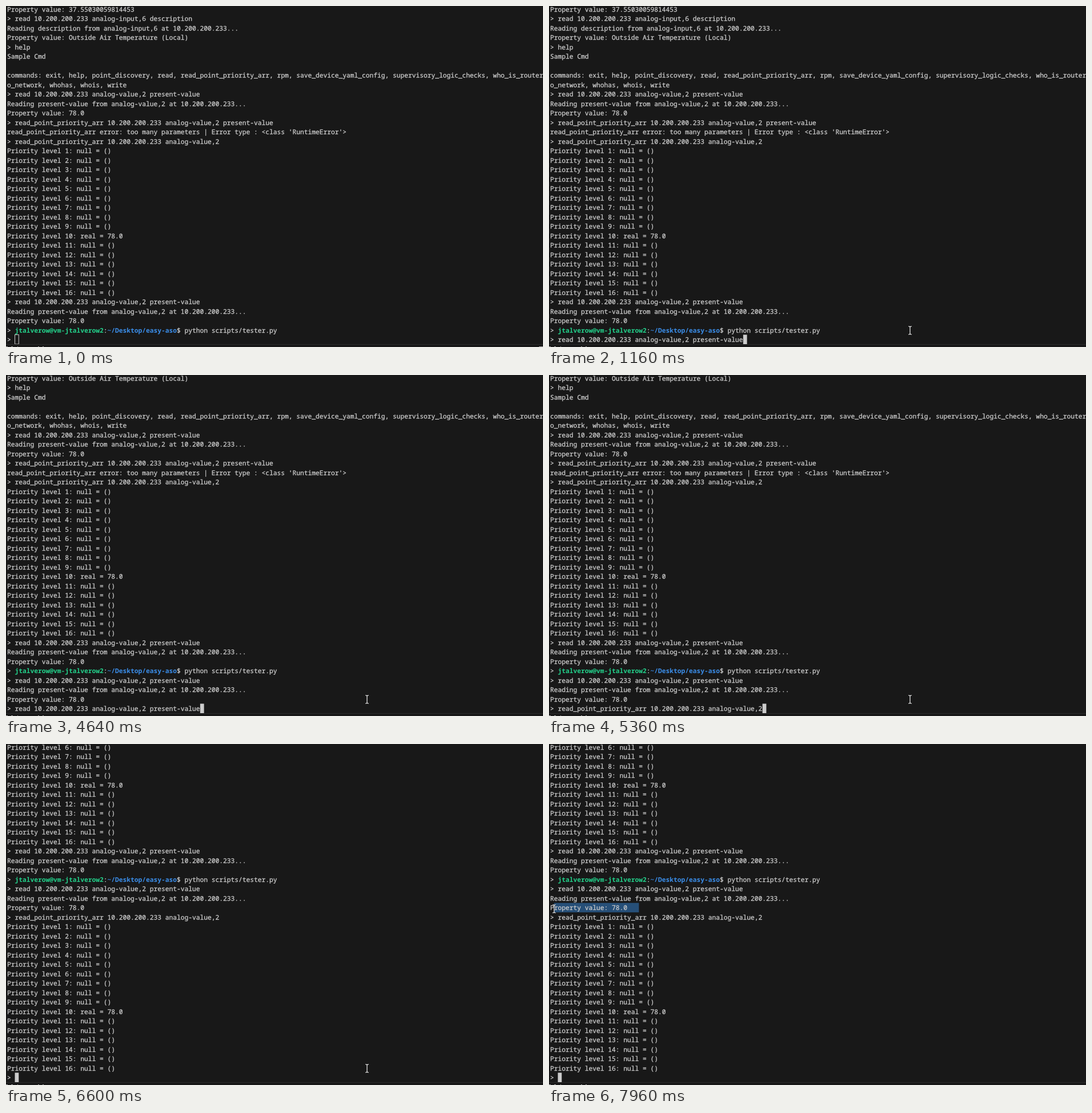
An HTML page that plays this animation: 940 px wide and 596 px high, repeating every 8000 ms.

```html
<!DOCTYPE html>
<html lang="en">
<head>
<meta charset="utf-8">
<title>Terminal</title>
<style>
  html, body { margin: 0; width: 100%; height: 100%; overflow: hidden; background: #181818; }
  #stage { position: relative; width: 940px; height: 596px; overflow: hidden; background: #181818; }
  #stage > * { position: absolute; }
  #text {
    left: 2px; top: -1.5px; color: #ccc; white-space: pre;
    font: 11.262px/16.5px "Noto Sans Mono", "DejaVu Sans Mono", monospace;
    font-variant-ligatures: none; text-rendering: geometricPrecision;
    -webkit-text-stroke: .3px currentColor;
  }
  #text div { height: 16.5px; }
  b { color: #23d18b; -webkit-text-stroke: 0; }
  b.path { color: #3b8eea; }
  #boxes { left: 0; top: 0; }
  #mark { fill: #264f78; }
  #caret { fill: #ccc; }
  #caret.hollow { fill: none; stroke: #ccc; }
  #edge { left: 0; top: 591px; width: 940px; height: 1px; background: #2b2b2b; }
  #status i { position: absolute; top: 595px; height: 1px; background: #aaa; }
  #mouse { left: -5px; top: -9px; width: 10px; height: 18px; }
</style>
</head>
<body>
<div id="stage">
  <svg id="boxes" width="940" height="596">
    <rect id="mark" y="277.75" height="16.5"/>
    <rect id="caret" y="574.5" width="6.757" height="16.5"/>
  </svg>
  <div id="text"></div>
  <div id="edge"></div>
  <div id="status">
    <i style="left:0;width:3px"></i><i style="left:9px;width:3px"></i>
    <i style="left:20px;width:1px"></i><i style="left:56px;width:2px"></i>
    <i style="left:64px;width:2px"></i><i id="corner" style="left:933px;width:7px"></i>
  </div>
  <svg id="mouse" viewBox="-5 -9 10 18" fill="none">
    <path d="M-3 -7H-1L0 -6L1 -7H3M0 -6V6M-3 7H-1L0 6L1 7H3" stroke="#000" stroke-width="2.6" opacity=".5"/>
    <path d="M-3 -7H-1L0 -6L1 -7H3M0 -6V6M-3 7H-1L0 6L1 7H3" stroke="#fff" stroke-width="1.2"/>
  </svg>
</div>
<script>
const LOOP = 8000, TICK = 40, ROWS = 36, CELL = 6.757, LEFT = 2;
const $ = id => document.getElementById(id);
const text = $('text'), caret = $('caret'), mark = $('mark'), mouse = $('mouse'), corner = $('corner');

const HOST = '10.200.200.233';
const readCmd = `read ${HOST} analog-value,2 present-value`;
const arrCmd = `read_point_priority_arr ${HOST} analog-value,2`;
const readOut = [`Reading present-value from analog-value,2 at ${HOST}...`, 'Property value: 78.0'];
const arrOut = Array.from({ length: 16 }, (_, i) =>
  `Priority level ${i + 1}: ${i === 9 ? 'real = 78.0' : 'null = ()'}`);
const shell = '> <b>jtalverow@vm-jtalverow2</b>:<b class="path">~/Desktop/easy-aso</b>$ python scripts/tester.py';
const esc = s => s.replace(/</g, '&lt;').replace(/>/g, '&gt;');

const history = [
  'Property value: 37.55030059814453',
  `> read ${HOST} analog-input,6 description`,
  `Reading description from analog-input,6 at ${HOST}...`,
  'Property value: Outside Air Temperature (Local)',
  '> help',
  'Sample Cmd',
  '',
  'commands: exit, help, point_discovery, read, read_point_priority_arr, rpm, save_device_yaml_config, supervisory_logic_checks, who_is_router_t',
  'o_network, whohas, whois, write',
  '> ' + readCmd, ...readOut,
  `> ${arrCmd} present-value`,
  "read_point_priority_arr error: too many parameters | Error type : <class 'RuntimeError'>",
  '> ' + arrCmd, ...arrOut,
  '> ' + readCmd, ...readOut
].map(esc).concat(shell);

const afterRead = [...history, ...['> ' + readCmd, ...readOut].map(esc)];
const sent = [...afterRead, esc('> ' + arrCmd)];
const afterArr = [...sent, ...arrOut];

// [start time, finished lines, line being edited]
const scenes = [
  [0, history, '> '],
  [1160, history, '> ' + readCmd],
  [4040, afterRead, '> '],
  [4640, afterRead, '> ' + readCmd],
  [5360, afterRead, '> ' + arrCmd],
  [6560, sent, ''],
  [6600, afterArr, '> ']
];

// [time, x, y]
const path = [
  [40, 936, 588], [200, 830, 564], [400, 690, 543], [560, 640, 556], [680, 632, 567],
  [7160, 632, 567], [7320, 480, 430], [7480, 270, 270], [7560, 200, 243],
  [7680, 157, 286], [7960, 9, 288]
];
const FOCUS = 640, PRESS = 7680, PRESS_COL = 23;

function mouseAt(t) {
  const i = path.findIndex(p => p[0] >= t);
  if (i <= 0) return path[0].slice(1);
  const [t0, x0, y0] = path[i - 1], [t1, x1, y1] = path[i];
  const k = (t - t0) / (t1 - t0);
  return [Math.round(x0 + (x1 - x0) * k), Math.round(y0 + (y1 - y0) * k)];
}

const colX = col => LEFT + col * CELL;
let shown = null;

function show(scene) {
  if (scene === shown) return;
  shown = scene;
  const [, lines, live] = scene;
  text.innerHTML = [...lines, esc(live)].slice(-ROWS).map(s => `<div>${s}</div>`).join('');
  caret.setAttribute('x', colX(live.length));
}

function draw(now) {
  const t = Math.floor(now % LOOP / TICK) * TICK;
  show(scenes.filter(s => s[0] <= t).pop());
  caret.classList.toggle('hollow', t < FOCUS);
  corner.style.display = t < TICK ? '' : 'none';

  const [x, y] = mouseAt(t);
  mouse.style.display = t < TICK ? 'none' : '';
  mouse.style.transform = `translate(${x}px, ${y}px)`;

  const from = colX(Math.round((x - LEFT) / CELL));
  mark.setAttribute('x', from);
  mark.setAttribute('width', t > PRESS ? Math.max(0, colX(PRESS_COL) - from) : 0);
  requestAnimationFrame(draw);
}
draw(performance.now());
</script>
</body>
</html>
```
